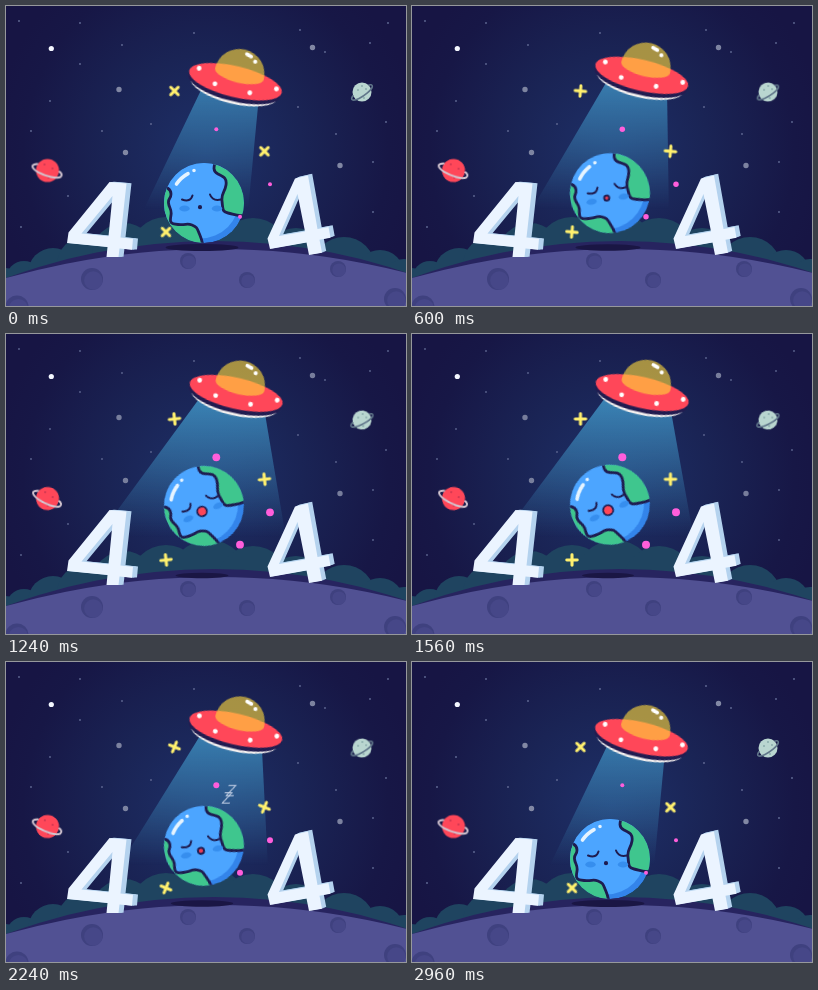
An HTML page that plays this animation: 400x300 px, repeating every 3 s.

```html
<!DOCTYPE html>
<html lang="en">
<head>
<meta charset="utf-8">
<title>404</title>
<style>
  html, body { margin: 0; width: 100%; height: 100%; overflow: hidden; background: #171645; }
  svg { display: block; width: 100vw; height: 100vh; }

  /* Everything floats up, rests briefly, and sinks back in one 3 s cycle. */
  .float { animation: 3s cubic-bezier(.36, 0, .64, 1) infinite; }
  .earth { animation-name: earth; }
  .ufo { animation-name: ufo; }
  .beam { animation-name: beam; }
  .shadow { animation-name: shadow; }
  .mouth { animation-name: mouth; }
  .dot { animation-name: dot; }
  .spark { animation-name: spark; }
  .tilt { animation-name: tilt; }
  .twinkle { animation-name: twinkle; }

  @keyframes earth {
    0%, 98.67%, 100% { transform: translate(198px, 197px) rotate(0deg); }
    48%, 50.67% { transform: translate(198px, 170.7px) rotate(-25deg); }
  }
  @keyframes ufo {
    0%, 98.67%, 100% { transform: translate(229.5px, 75.7px) rotate(13.5deg); }
    48%, 50.67% { transform: translate(230.2px, 58.5px) rotate(13deg); }
  }
  @keyframes beam {
    0%, 98.67%, 100% { d: path("M196,82L252.5,95L242,205L137,205Z"); }
    48%, 50.67% { d: path("M193,64L259.5,80L282,205L88,205Z"); }
  }
  @keyframes shadow {
    0%, 98.67%, 100% { rx: 36.5px; ry: 3.6px; }
    48%, 50.67% { rx: 26px; ry: 2.8px; }
  }
  @keyframes mouth {
    0%, 98.67%, 100% { r: 1.1px; stroke-width: 2px; fill: #1e1c50; }
    12% { fill: #e23a55; }
    48%, 50.67% { r: 5px; stroke-width: 1.8px; fill: #ff4759; }
    86% { fill: #e23a55; }
    92% { fill: #1e1c50; }
  }
  @keyframes dot {
    0%, 98.67%, 100% { r: 2px; }
    48%, 50.67% { r: 4px; }
  }
  @keyframes spark {
    0%, 98.67%, 100% { transform: rotate(45deg); }
    48%, 50.67% { transform: rotate(180deg); }
  }
  @keyframes tilt {
    0%, 98.67%, 100% { transform: rotate(0deg); }
    48%, 50.67% { transform: rotate(7deg); }
  }
  @keyframes twinkle {
    0%, 98.67%, 100% { opacity: 1; }
    48%, 50.67% { opacity: .9; }
  }

  .snore { opacity: 0; animation: snore 3s linear infinite; }
  .late { animation-delay: .28s; }
  @keyframes snore {
    0%, 62% { opacity: 0; transform: translate(220px, 138px) skewX(-15deg); }
    64.5% { opacity: .85; }
    75% { opacity: .85; transform: translate(225.4px, 127.8px) skewX(-15deg); }
    80% { transform: translate(228px, 124px) skewX(0deg); }
    88.67%, 100% { opacity: 0; transform: translate(231px, 118px) skewX(0deg); }
  }
  text { font: 500 16.5px "Open Sans", "Noto Sans", sans-serif; fill: #c9d5ea; text-anchor: middle; }
</style>
</head>
<body>
<svg viewBox="0 0 400 300">
  <defs>
    <radialGradient id="sky" gradientUnits="userSpaceOnUse" cx="200" cy="145" r="215">
      <stop offset="0" stop-color="#1e3068"/>
      <stop offset=".45" stop-color="#1a2455"/>
      <stop offset=".85" stop-color="#171746"/>
      <stop offset="1" stop-color="#171544"/>
    </radialGradient>
    <linearGradient id="light" gradientUnits="userSpaceOnUse" x1="0" y1="70" x2="0" y2="203">
      <stop offset="0" stop-color="#4197c8" stop-opacity=".8"/>
      <stop offset="1" stop-color="#4197c8" stop-opacity="0"/>
    </linearGradient>
    <clipPath id="globe"><circle r="40"/></clipPath>
    <g id="crater">
      <circle r="10" fill="#3f417f"/>
      <circle cx="1.2" cy="1.4" r="8.4" fill="#464788"/>
    </g>
    <path id="cross" d="M-5.2,0H5.2M0,-5.2V5.2" stroke="#fff06e" stroke-width="3.1" stroke-linecap="round"/>
    <path id="fourA" fill-rule="evenodd" d="M103.5,176L120.5,177.5L114.5,231.5L127,232.8L126,243.8L113.5,242.5L112.5,251H100.5L101.5,241L61,237L62.5,226.5ZM106.5,190L75.5,227.5L102.5,230.3Z"/>
    <path id="fourB" fill-rule="evenodd" d="M289,172.5L302,169.5L311.5,223L322.5,221L324.5,231.7L313.5,233.8L316,246.8L303,249L300.5,236.5L264,243L261.5,232.5ZM291.5,188L273,230L299,225.5Z"/>
  </defs>

  <rect width="400" height="300" fill="url(#sky)"/>

  <g fill="none" stroke-linecap="round">
    <path class="float twinkle" stroke="#5d6690" stroke-width="2"
      d="M13,15h0M74,17h0M74,58h0M116,39h0M188,27h0M294,24h0M319,46h0M364,37h0M382,17h0M44,95h0M25,125h0M96,125h0M145,118h0M62,190h0M15,221h0M292,101h0M330,128h0M367,156h0M380,116h0M367,206h0"/>
    <path class="float twinkle" stroke="#8288a4" stroke-width="5.4" d="M306.5,41.5h0M113,83.5h0M119.5,146.5h0M334,159.5h0"/>
    <path stroke="#f4f7ff" stroke-width="5.2" d="M45.3,42.5h0"/>
  </g>

  <g transform="translate(41.5 164.5)">
    <g class="float tilt" fill="none">
      <circle r="11.5" fill="#ff4759"/>
      <path d="M-3,-6h0M5,-2h0M1,7h0" stroke="#c93450" stroke-width="2" stroke-linecap="round"/>
      <path transform="rotate(19)" d="M-11,-3C-18,-1 -17,3 -8,4.8C0,6.2 12,5 14.5,1.8C16,-.5 14,-2.2 11,-3" stroke="#d3c5d0" stroke-width="2"/>
    </g>
  </g>

  <g transform="translate(356 86)">
    <g class="float tilt" fill="none">
      <circle r="9.5" fill="#b9d6d0"/>
      <path d="M0,-6h0M4,-3h0M-4,-2h0M2,6h0" stroke="#84a8a8" stroke-width="1.8" stroke-linecap="round"/>
      <path transform="rotate(-33)" d="M-9,-2C-15,0 -13,3 -6,3.8C0,4.4 9,3.6 11.5,1.2C13,-.6 11,-2 9,-2.2" stroke="#60768a" stroke-width="1.6"/>
    </g>
  </g>

  <path class="float beam" fill="url(#light)" d="M196,82L252.5,95L242,205L137,205Z"/>

  <g fill="#1f4460">
    <circle cx="-2" cy="284" r="22"/>
    <circle cx="18" cy="273" r="18"/>
    <circle cx="47" cy="267" r="25"/>
    <circle cx="80" cy="259" r="29"/>
    <circle cx="118" cy="249" r="32"/>
    <circle cx="160" cy="247" r="36"/>
    <circle cx="203" cy="246" r="40"/>
    <circle cx="247" cy="248" r="36"/>
    <circle cx="290" cy="255" r="33"/>
    <circle cx="338" cy="262" r="31"/>
    <circle cx="374" cy="268" r="24"/>
    <circle cx="398" cy="275" r="22"/>
  </g>
  <circle cx="208" cy="838" r="603" fill="#27245f"/>
  <circle cx="210" cy="1018" r="775" fill="#515193"/>

  <use href="#crater" transform="translate(86 273) scale(1.1)"/>
  <use href="#crater" transform="translate(182 255) scale(.8)"/>
  <use href="#crater" transform="translate(241 274) scale(.8)"/>
  <use href="#crater" transform="translate(332 263) scale(.8)"/>
  <use href="#crater" transform="translate(11 301) scale(1.15)"/>
  <use href="#crater" transform="translate(389 293) scale(1.1)"/>

  <g fill="#b4d2ee">
    <use href="#fourA" x="1.7" y="-.1"/>
    <use href="#fourA" x="3.4" y="-.2"/>
    <use href="#fourA" x="5" y="-.3"/>
    <use href="#fourB" x="1.4" y="-.6"/>
    <use href="#fourB" x="2.8" y="-1.2"/>
    <use href="#fourB" x="4.2" y="-1.8"/>
  </g>
  <g fill="#ebf4ff">
    <use href="#fourA"/>
    <use href="#fourB"/>
  </g>

  <ellipse class="float shadow" cx="196" cy="241.5" rx="36" ry="3.5" fill="#1a1644"/>

  <g class="float earth">
    <g clip-path="url(#globe)">
      <circle r="40" fill="#3384ea"/>
      <circle cx="-4" cy="-4" r="39.5" fill="#4ca5ff"/>
      <g fill="#3fc68e" stroke="#1e1c50" stroke-width="2.8" stroke-linejoin="round">
        <path d="M12,-44C10,-37 8,-32 14,-29S23,-25 22,-18S17,-10 18,-2S18,9 24,10S32,14 44,12L60,0L50,-60Z"/>
        <path d="M-44,-16C-38,-17 -33,-14 -33,-9S-36,-5 -35.5,0S-32,6 -33,12S-35,21 -26,21.5S-17,20 -12,22S-7,25 -5,30S-2,36 -1,44L0,60H-60Z"/>
      </g>
    </g>
    <g fill="#368eee">
      <ellipse cx="-19.5" cy="5.5" rx="5.2" ry="3"/>
      <ellipse cx="13" cy="5.5" rx="5.2" ry="3"/>
    </g>
    <g fill="none" stroke-linecap="round">
      <path d="M-22,-3.5Q-13.5,-.5 -11.5,-7.5M6,-8.5Q8.5,-1.5 17,-3.5" stroke="#1e1c50" stroke-width="2"/>
      <path d="M-27.5,-19A33.5,33.5 0 0 1 -16,-29.4M-10,-32.5h0" stroke="#e6f4ff" stroke-width="3.6"/>
    </g>
    <circle class="float mouth" cx="-4" cy="4.2" r="1.1" fill="#1e1c50" stroke="#1e1c50"/>
  </g>

  <g class="float ufo">
    <ellipse cy="6.4" rx="44.5" ry="15.8" fill="#f3efee"/>
    <ellipse cy="3.6" rx="47.6" ry="16" fill="#211c50"/>
    <ellipse rx="47.6" ry="15.4" fill="#ff4759"/>
    <path d="M-23,-8.5A25,25 0 0 1 27,-8.5A25,9 0 0 1 -23,-8.5Z" fill="#ffd83a" fill-opacity=".61"/>
    <g fill="none" stroke="#fff" stroke-linecap="round">
      <path d="M4.5,-29.5L9.5,-28" stroke-width="3.4"/>
      <path d="M14.5,-24h0" stroke-width="4.2"/>
      <path d="M-38.5,-4.5h0M-19.5,6.8h0M16.5,7.5h0M41.5,-2.5h0" stroke-width="4.8"/>
    </g>
  </g>

  <g fill="#ff5edb">
    <circle class="float dot" cx="210.3" cy="123.3" r="2"/>
    <circle class="float dot" cx="264" cy="178.3" r="2"/>
    <circle class="float dot" cx="234" cy="210.7" r="2"/>
  </g>
  <g transform="translate(168.5 85)"><use class="float spark" href="#cross"/></g>
  <g transform="translate(258.5 145.3)"><use class="float spark" href="#cross"/></g>
  <g transform="translate(160 226)"><use class="float spark" href="#cross"/></g>

  <text class="snore" y="5.9">Z</text>
  <text class="snore late" y="5.9">Z</text>
</svg>
</body>
</html>
```
